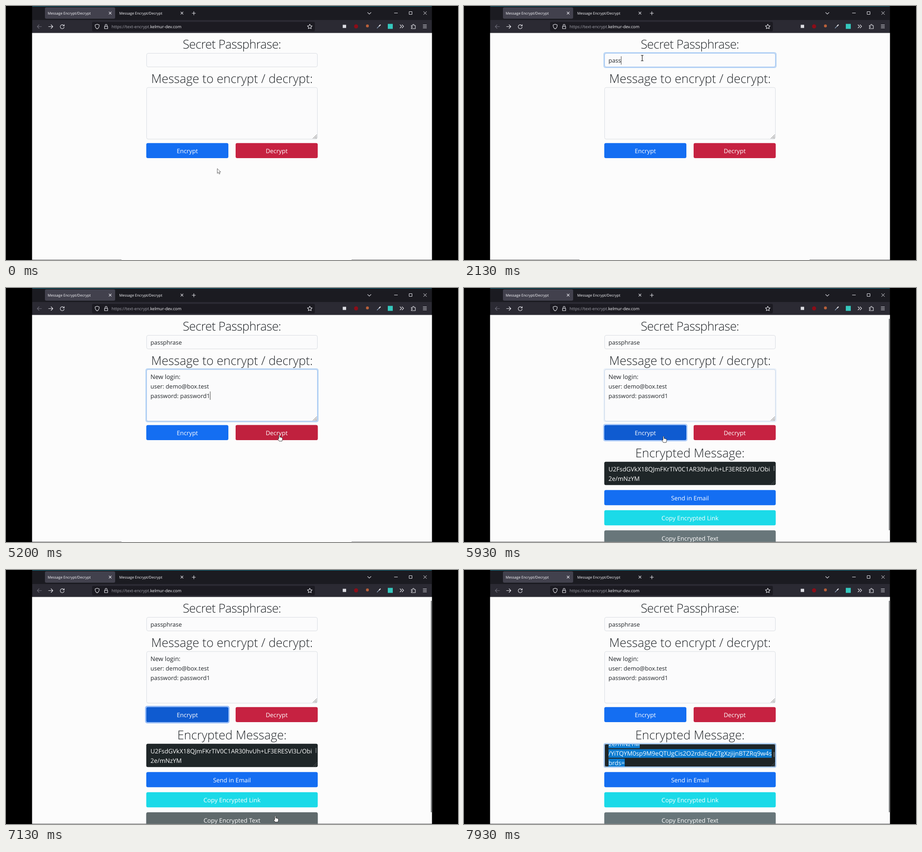
These frames come from a looping animation (998x561 px, 8000 ms). An HTML page:

```html
<!DOCTYPE html>
<html lang="en">
<head>
<meta charset="utf-8">
<title>Message Encrypt/Decrypt</title>
<style>
  html, body { margin: 0; width: 100%; height: 100%; overflow: hidden; background: #000; }
  svg { display: block; width: 998px; height: 561px; }
  text { font-family: "Open Sans", "Noto Sans", sans-serif; text-rendering: geometricPrecision; white-space: pre; }
  .heading { font-size: 26.9px; font-weight: 300; text-anchor: middle; fill: #212529; }
  .tight { letter-spacing: -.6px; }
  .body { font-size: 13px; fill: #212529; }
  .label { font-size: 13.3px; text-anchor: middle; fill: #fff; }
  .cipher { font-size: 13.5px; fill: #fff; }
  .tab { font-size: 8px; fill: #fbfbfe; }
  .url { font-size: 9.2px; fill: #fbfbfe; }
  .icon { fill: none; stroke: #e8e8ee; stroke-width: 1.1; stroke-linecap: round; stroke-linejoin: round; }
  .field { fill: #fbfbfc; stroke: #d9dde2; }
</style>
</head>
<body>
<svg viewBox="0 0 998 561">
  <defs>
    <clipPath id="pageClip"><rect x="57.6" y="59.5" width="882.9" height="501"/></clipPath>
    <clipPath id="outClip"><rect x="309.700" y="383.700" width="378.600" height="51.500" rx="3.500"/></clipPath>
  </defs>

  <!-- browser window -->
  <rect x="57.600" width="882.900" height="560.500" fill="#1b1b21"/>
  <rect x="58" width="882" height="1" fill="#0d7185"/>
  <rect x="86" y="3" width="155" height="25" rx="3" fill="#42414d"/>
  <text class="tab" x="92" y="18.500">Message Encrypt/Decrypt</text>
  <text class="tab" x="250" y="18.500">Message Encrypt/Decrypt</text>
  <rect x="58" y="31" width="882" height="28" fill="#2b2a33"/>
  <rect x="190" y="35" width="492" height="21" rx="3" fill="#1c1b22"/>
  <text class="url" x="233" y="49"><tspan fill="#a3a3ac">https://text-encrypt.</tspan>kelmur-dev.com</text>
  <g class="icon">
    <path d="M227.500 13.200l5 5m0-5l-5 5M386 13.200l5 5m0-5l-5 5M411 16h7.400m-3.700-3.700v7.400M798.500 14.300l3.700 3.500 3.700-3.500"/>
    <path stroke-width="1" d="M857.500 15.500h7M890.500 12.500h6v6h-6zM922 12.300l6.600 6.600m0-6.600l-6.600 6.600"/>
    <path stroke="#6c6b76" d="M78.500 45.500h-9.500m4-4l-4 4 4 4"/>
    <path d="M94 45.500h9.500m-4-4l4 4-4 4"/>
    <path d="M127.800 43.300a4.400 4.400 0 1 0 .6 3.600M128.600 41v3h-3"/>
    <path d="M201.300 40.300l4.500 1.500c.2 4-.9 7-4.500 8.800-3.600-1.800-4.700-4.800-4.500-8.800z"/>
    <path d="M217.500 45h7v5h-7zM219 45v-2.500a2 2 0 0 1 4 0V45"/>
    <path d="M670.700 40.200l1.600 3.300 3.600.5-2.600 2.500.6 3.600-3.200-1.700-3.200 1.700.6-3.600-2.600-2.500 3.600-.5z"/>
    <path d="M870 41.500l3.500 3.500-3.500 3.500m4.500-7l3.500 3.500-3.500 3.500"/>
    <path d="M895 43h3v-1a1.500 1.500 0 0 1 3 0v1h2.800v7H895v-2.300h1a1.200 1.200 0 0 0 0-2.400h-1z"/>
    <path d="M921 41.800h7.500m-7.500 3.200h7.500m-7.500 3.200h7.500"/>
    <path stroke="#8ea5c0" stroke-width="1.300" d="M819.500 48.800l4-4"/>
    <path stroke-width="2" d="M824 44.200l2.500-2.500"/>
  </g>
  <rect x="743.500" y="41.500" width="7.500" height="7" fill="#dcdce2"/>
  <circle cx="773" cy="45" r="4.500" fill="#8c0d18"/>
  <circle cx="798" cy="44" r="3.200" fill="#b9603a"/>
  <rect x="843" y="39.500" width="11" height="11" fill="#35c8be"/>

  <g clip-path="url(#pageClip)">
    <rect x="57" y="59" width="884" height="502" fill="#fcfcfc"/>
    <text class="heading tight" x="498.700" y="94">Secret Passphrase:</text>
    <text class="heading" x="499" y="169.500">Message to encrypt / decrypt:</text>
    <rect class="field" x="310.500" y="104.500" width="377" height="30" rx="3.500"/>
    <rect class="field" x="310.500" y="180" width="377" height="114" rx="3.500"/>
    <path d="M677.500 293l9-9m-5.500 9l5.500-5.500m-2.500 5.500l2.500-2.500" stroke="#555" stroke-width=".9"/>
    <text class="body" id="pass" x="319" y="125"></text>
    <g class="body" id="message">
      <text x="319" y="200.500" font-size="13.600">New login:</text>
      <text x="319" y="221.600">user: demo@box.test</text>
      <text id="lastLine" x="319" y="242.700">password: password1</text>
    </g>
    <g id="output">
      <text class="heading" x="499" y="373.500">Encrypted Message:</text>
      <g clip-path="url(#outClip)">
        <rect x="309" y="383" width="380" height="53" fill="#1f2628"/>
        <g id="cipher"></g>
        <rect id="thumb" x="683.700" width="1.600" height="11" fill="#7d8284"/>
        <path d="M678 434l9-9m-5 9l5-5" stroke="#555b5d" stroke-width=".9"/>
      </g>
      <rect x="938" y="68" width="2" height="467" fill="#777a7c"/>
    </g>
    <g id="buttons"></g>
    <g id="glows"></g>
    <rect id="caret" width="1" fill="#444"/>
    <g id="cursor" stroke-linejoin="round">
      <path id="arrow" d="M0 0V10.700L2.500 8.400 4.200 12.200 6 11.400 4.300 7.700H7.600Z" fill="#fff" stroke="#333" stroke-width=".75"/>
      <path id="beam" d="M-2.800-6H-.6L0-5.400.6-6H2.800M0-5.400V5.400M-2.800 6H-.6L0 5.400.6 6H2.800" fill="none" stroke="#111" stroke-width="1.100"/>
      <path id="hand" d="M-1.200 1Q0-.8 1.200 1V5Q2.500 4.300 3.300 5.400 4.600 4.900 5.200 6 6.800 5.700 6.900 7.200V10.200L5.900 13.700H-.4L-3.400 9.200Q-3.400 7.500-1.200 8.600Z" fill="#fff" stroke="#111" stroke-width=".8"/>
    </g>
  </g>
</svg>
<script>
const LOOP = 8000, FADE = 150;
const CLICK = { pass: 1030, message: 3620, encrypt: 5830, copy: 7330 };
const PASTE = 4470, LINE = 21.1;
const WORD = 'passphrase';
const KEY_TIMES = [1770, 1830, 1970, 2130, 2470, 2770, 2900, 3100, 3170, 3330];
const CIPHER = [
  'U2FsdGVkX18QJmFKrTlV0C1AR30hvUh+LF3ERESVl3L/Obi',
  '2e/mNzYM',
  '/YiTQYM0sp9M9eQTUgCis2O2rdaEqv2TgXzjijnBTZRq9w4s',
  'brds='
];
// time, x, y of the pointer's hot spot
const PATH = [
  [0, 466.5, 359], [30, 466.5, 359], [700, 393.5, 115], [4670, 393.5, 115],
  [5130, 603.5, 324.5], [5250, 603.5, 324.5], [5430, 600, 342], [5530, 600, 342],
  [5780, 440.5, 327.5], [6370, 440.5, 327.5], [7100, 594.5, 543], [7380, 594.5, 543],
  [7650, 594.5, 576], [LOOP, 594.5, 576]
];
const LEFT = 309.7, HALF = 181.3, FULL = 378.6, BUTTON_H = 33.4;
const BUTTONS = [
  { id: 'encrypt', label: 'Encrypt', x: LEFT, y: 302.7, w: HALF, color: '#146ef2', hover: '#0f5bd0' },
  { id: 'decrypt', label: 'Decrypt', x: 507, y: 302.7, w: HALF, color: '#c62241', hover: '#c0213e' },
  { label: 'Send in Email', x: LEFT, y: 446.3, w: FULL, color: '#146ef2', hover: '#0f5bd0', late: true },
  { label: 'Copy Encrypted Link', x: LEFT, y: 490.8, w: FULL, color: '#1bdae8', hover: '#2fd0e6', late: true },
  { label: 'Copy Encrypted Text', x: LEFT, y: 535.3, w: FULL, color: '#68767a', hover: '#5e676a', late: true }
];
const GLOWS = [
  { id: 'pass', x: 310.5, y: 104.5, w: 377, h: 30 },
  { id: 'message', x: 310.5, y: 180, w: 377, h: 114 },
  { id: 'encrypt', x: LEFT, y: 302.7, w: HALF, h: BUTTON_H, button: true },
  { id: 'copy', x: 310.5, y: 384.5, w: 377, h: 50 }
];

const $ = id => document.getElementById(id);
const show = (el, on) => el.setAttribute('visibility', on ? 'inherit' : 'hidden');
const rect = (x, y, w, h, rest) => `<rect x="${x}" y="${y}" width="${w}" height="${h}" rx="3.5" ${rest}/>`;

$('buttons').innerHTML = BUTTONS.map(b => `<g>
  ${rect(b.x, b.y, b.w, BUTTON_H, `fill="${b.color}"`)}
  ${rect(b.x, b.y, b.w, BUTTON_H, `fill="${b.hover}" class="over"`)}
  <text class="label" x="${b.x + b.w / 2}" y="${b.y + 22.2}">${b.label}</text></g>`).join('');
BUTTONS.forEach((b, i) => {
  b.el = $('buttons').children[i];
  b.over = b.el.querySelector('.over');
});

$('glows').innerHTML = GLOWS.map(g => `<g fill="none">
  ${rect(g.x - 1.4, g.y - 1.4, g.w + 2.8, g.h + 2.8, `stroke="${g.button ? '#91b9f8' : '#b9d5f5'}" stroke-width="2.4"`)}
  ${g.button ? '' : rect(g.x, g.y, g.w, g.h, 'stroke="#9fc4f2"')}</g>`).join('');
GLOWS.forEach((g, i) => g.el = $('glows').children[i]);

$('cipher').innerHTML = CIPHER.map((line, i) => {
  const y = 404.5 + i * LINE;
  return `<rect x="319" y="${y - 14}" height="19" fill="#0b7bd0"/><text class="cipher" x="319" y="${y}">${line}</text>`;
}).join('');
const marks = [...$('cipher').querySelectorAll('rect')];

function pointer(t) {
  const i = Math.max(1, PATH.findIndex(p => p[0] >= t));
  const [t0, x0, y0] = PATH[i - 1], [t1, x1, y1] = PATH[i];
  const u = Math.min(1, Math.max(0, (t - t0) / (t1 - t0)));
  const e = u * u * (3 - 2 * u);
  return { x: x0 + (x1 - x0) * e, y: y0 + (y1 - y0) * e };
}

const inside = (p, x, y, w, h) => p.x >= x && p.x <= x + w && p.y >= y && p.y <= y + h;
const hovered = (b, t) => (!b.late || t >= CLICK.encrypt) && inside(pointer(t), b.x, b.y, b.w, BUTTON_H);
const focusAt = t => Object.keys(CLICK).filter(id => CLICK[id] <= t).pop();

// share of the last FADE ms in which the test held
function faded(test, t) {
  let sum = 0;
  for (let i = 0; i < 10; i++) sum += test(Math.max(0, t - i * FADE / 10));
  return sum / 10;
}

function drawCaret(t, focus) {
  const inPass = focus === 'pass', pasted = t >= PASTE;
  const keys = KEY_TIMES.filter(k => k <= t);
  const since = inPass ? keys.pop() ?? CLICK.pass : CLICK.message;
  const blinkOn = (t - since) % 1000 < 500;
  const line = inPass ? $('pass') : $('lastLine');
  const width = inPass || pasted ? line.getComputedTextLength() : 0;
  const caret = $('caret');
  show(caret, inPass ? blinkOn : focus === 'message' && (pasted || blinkOn));
  caret.setAttribute('x', 319 + width);
  caret.setAttribute('y', inPass ? 111 : pasted ? 228.5 : 186.5);
  caret.setAttribute('height', 18.5);
}

function drawCursor(t) {
  const p = pointer(t);
  const hand = BUTTONS.some(b => hovered(b, t));
  const beam = !hand && (inside(p, 310, 104, 378, 31) || inside(p, 322, 145, 354, 30) ||
    inside(p, 310, 180, 378, 114) ||
    (t >= CLICK.encrypt && (inside(p, 381, 350, 236, 29) || inside(p, 310, 384, 378, 51))));
  $('cursor').setAttribute('transform', `translate(${p.x} ${p.y})`);
  show($('hand'), hand);
  show($('beam'), beam);
  show($('arrow'), !hand && !beam);
}

function draw(t) {
  const focus = focusAt(t), done = t >= CLICK.encrypt, selected = t >= CLICK.copy;
  $('pass').textContent = WORD.slice(0, KEY_TIMES.filter(k => k <= t).length);
  show($('message'), t >= PASTE);
  show($('output'), done);
  $('cipher').setAttribute('transform', `translate(0 ${selected ? -37 : 0})`);
  $('thumb').setAttribute('y', selected ? 402 : 393);
  marks.forEach(m => {
    m.setAttribute('width', m.nextSibling.getComputedTextLength());
    show(m, selected);
  });
  BUTTONS.forEach(b => {
    show(b.el, !b.late || done);
    b.over.setAttribute('opacity', faded(s => hovered(b, s) || (b.id && focusAt(s) === b.id) ? 1 : 0, t));
  });
  GLOWS.forEach(g => g.el.setAttribute('opacity', faded(s => focusAt(s) === g.id ? 1 : 0, t)));
  drawCaret(t, focus);
  drawCursor(t);
}

const start = performance.now();
function tick() {
  draw((performance.now() - start) % LOOP);
  requestAnimationFrame(tick);
}
tick();
</script>
</body>
</html>
```
